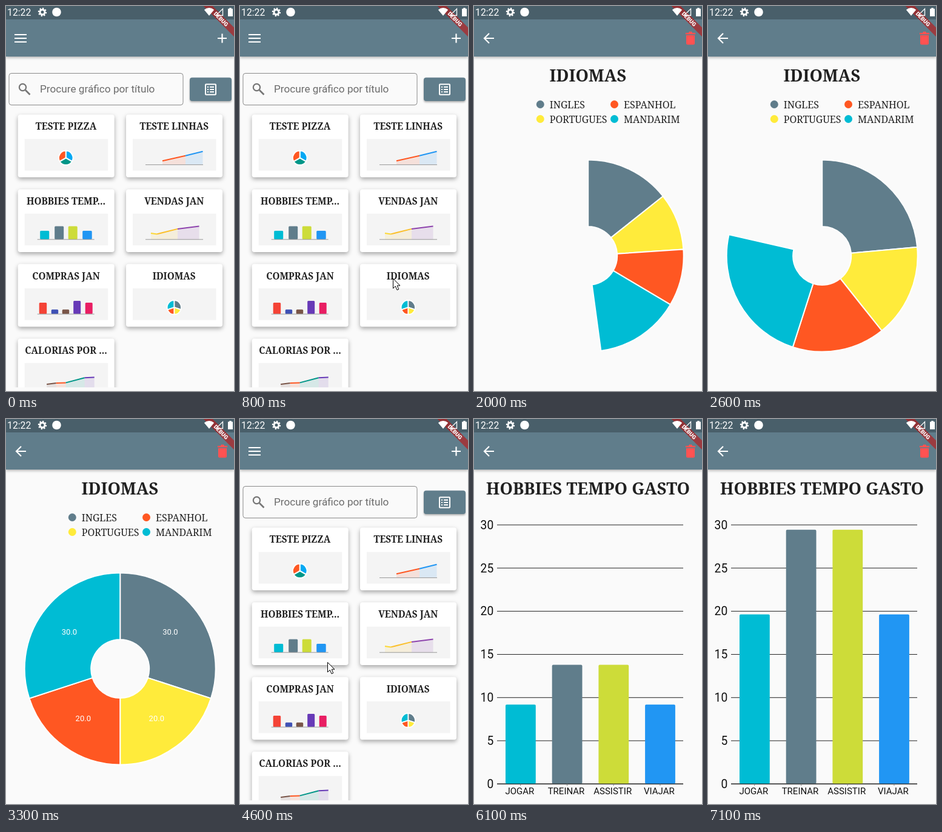
An HTML page for the animation above (7.2 s loop, 376 px wide and 632 px high).

```html
<!DOCTYPE html>
<html lang="pt">
<head>
<meta charset="utf-8">
<title>Gráficos</title>
<style>
  html, body { margin: 0; width: 100%; height: 100%; overflow: hidden; background: #fafafa; }
  svg { display: block; width: 376px; height: 632px; }
  text { font-family: Roboto, sans-serif; white-space: pre; }
  .serif { font-family: "Noto Serif", serif; }
  .title { font-weight: 700; fill: #212121; }
  .mid { text-anchor: middle; }
  .end { text-anchor: end; }
  .line { fill: none; stroke: #fff; stroke-width: 2.2; }
  .bar { filter: drop-shadow(0 2px 2px rgba(0,0,0,.28)); }
  .card { fill: #fff; filter: drop-shadow(0 3px 3.5px rgba(0,0,0,.34)); }
  .btn { filter: drop-shadow(0 2px 1.5px rgba(0,0,0,.3)); }
</style>
</head>
<body>
<svg viewBox="0 0 376 632">
  <defs><clipPath id="list"><rect y="84" width="376" height="542"/></clipPath></defs>
  <g id="home"></g>
  <g id="pie"></g>
  <g id="bars"></g>
  <g id="top"></g>
  <path id="cursor" d="M.5 .5V16.5L4.3 13 7 19.2 9.8 18 7.2 12H12Z" fill="#fff" stroke="#000"/>
</svg>
<script>
const $ = id => document.getElementById(id);
const LOOP = 7200, STEP = 100;
const C = {
  slate: '#607d8b', cyan: '#00bcd4', yellow: '#ffeb3b', orange: '#ff5722', lime: '#cddc39',
  blue: '#2196f3', sky: '#03a9f4', teal: '#009688', purple: '#673ab7', violet: '#8e44ad',
  red: '#f44336', indigo: '#3f51b5', brown: '#795548', pink: '#e91e63', gold: '#fbc02d'
};

const rect = (x, y, w, h, fill, extra = '') =>
  `<rect x="${x}" y="${y}" width="${w}" height="${h}" fill="${fill}" ${extra}/>`;
const text = (x, y, size, str, cls = '', fill = '#212121') =>
  `<text x="${x}" y="${y}" font-size="${size}" class="${cls}" fill="${fill}">${str}</text>`;
const hline = (x1, x2, y, color) => `<path d="M${x1} ${y}H${x2}" stroke="${color}"/>`;

const clamp = v => Math.min(1, Math.max(0, v));
const polar = (cx, cy, r, turn) => {
  const a = turn * 2 * Math.PI;
  return `${(cx + r * Math.sin(a)).toFixed(2)} ${(cy - r * Math.cos(a)).toFixed(2)}`;
};

// Slices run clockwise from the top; parts are [share, colour].
function slices(cx, cy, r, hole, parts, sweep, stroke) {
  let from = 0;
  return parts.map(([share, color]) => {
    const to = from + share * sweep, big = +(to - from > .5);
    const d = `M${polar(cx, cy, hole, from)}L${polar(cx, cy, r, from)}` +
      `A${r} ${r} 0 ${big} 1 ${polar(cx, cy, r, to)}L${polar(cx, cy, hole, to)}` +
      `A${hole} ${hole} 0 ${big} 0 ${polar(cx, cy, hole, from)}Z`;
    from = to;
    return `<path d="${d}" fill="${color}" stroke="#fff" stroke-width="${stroke}"/>`;
  }).join('');
}

const LANGS = [[.3, C.slate], [.2, C.yellow], [.2, C.orange], [.3, C.cyan]];

const appBar = icons =>
  rect(0, 0, 376, 632, '#fafafa') + rect(0, 0, 376, 83, C.slate, 'class="bar"') + icons;

// Previews use coordinates relative to their card.
const miniBars = bars => bars.map(([x, w, top, color]) =>
  rect(x, top, w, 82 - top, color, 'rx="1.5"')).join('') + hline(32, 126, 82.3, '#999');

function miniLine(base, parts) {
  return parts.map(([color, ...pts]) => {
    const d = 'M' + pts.map(p => p.join(' ')).join('L');
    const last = pts[pts.length - 1][0];
    return `<path d="${d}V${base}H${pts[0][0]}Z" fill="${color}" opacity=".12"/>` +
      `<path d="${d}" fill="none" stroke="${color}" stroke-width="2"/>`;
  }).join('') + hline(32, 127, base, '#999');
}

const CARDS = [
  ['TESTE PIZZA', slices(79, 71, 11.8, .5, [[1 / 3, C.sky], [1 / 3, C.teal], [1 / 3, C.orange]], 1, 2)],
  ['TESTE LINHAS', miniLine(82.3, [
    [C.orange, [60, 76], [98, 67.5]], [C.blue, [98, 67.5], [126.5, 60.5]]])],
  ['HOBBIES TEMP...', miniBars([
    [36.5, 15, 68, C.cyan], [60.5, 15, 60.5, C.slate], [83, 15, 60.5, C.lime], [106.5, 15.5, 68, C.blue]])],
  ['VENDAS JAN', miniLine(82.3, [
    ['#fdd835', [41, 72], [51, 73.5]], [C.gold, [51, 73.5], [85, 65]], [C.violet, [85, 65], [120.5, 60.5]]])],
  ['COMPRAS JAN', miniBars([
    [35, 12.5, 63.5, C.red], [55, 11.5, 74.7, C.indigo], [73, 11.5, 74.7, C.brown],
    [91.5, 12, 60.5, C.purple], [111, 12, 63.5, C.pink]])],
  ['IDIOMAS', slices(79.3, 71.3, 11.6, .5, LANGS, 1, 1.8)],
  ['CALORIAS POR ...', miniLine(82.3, [
    [C.brown, [47.5, 75], [63, 72.8]], [C.orange, [63, 72.8], [79, 72.3]],
    [C.teal, [79, 72.3], [110, 64.2]], [C.purple, [110, 64.2], [126, 63.5]]])]
];

const card = ([name, chart], i) =>
  `<g transform="translate(${i % 2 ? 198 : 19.7} ${178.3 + (i >> 1) * 122.6})">` +
  rect(0, 0, 159, 103, '#fff', 'rx="4" class="card"') +
  text(79.3, 25, 15.3, name, 'serif title mid') +
  rect(11, 40, 137.5, 52, '#f4f4f4') + chart + '</g>';

$('home').innerHTML = appBar(
    '<path class="line" d="M14 47H34M14 53H34M14 59H34M349 53H364M356.5 45.5V60.5"/>') +
  rect(5, 110.5, 287, 52, 'none', 'rx="4" stroke="#8a8a8a"') +
  '<path d="M32 138L39.5 145.5" stroke="#757575" stroke-width="2.6"/>' +
  '<circle cx="27.5" cy="133.5" r="5.6" fill="none" stroke="#757575" stroke-width="2.2"/>' +
  text(56, 142, 17.2, 'Procure gráfico por título', '', '#6c6c6c') +
  rect(303, 117.5, 69, 38.5, C.slate, 'rx="4" class="btn"') +
  rect(329, 128.5, 17, 17, 'none', 'rx="1" stroke="#fff" stroke-width="2"') +
  '<path d="M332 133H334M332 137H334M332 141H334M336 133H343M336 137H343M336 141H343" stroke="#fff" stroke-width="2"/>' +
  `<g clip-path="url(#list)">${CARDS.map(card).join('')}</g>`;

const detail = name => appBar(
    '<path class="line" d="M33 53H17M25 45L17 53L25 61"/>' +
    '<path d="M349 44H354L355 42H359L360 44H365V46.5H349ZM350 48H364V61Q364 63.5 361.5 63.5H352.5Q350 63.5 350 61Z" fill="#ff5252"/>') +
  text(188, 124.3, 27.3, name, 'serif title mid');

const legend = (x, y, color, name) =>
  `<circle cx="${x}" cy="${y}" r="6.5" fill="${color}"/>` + text(x + 15.5, y + 6, 16, name, 'serif');

const value = (x, y, str) => text(x, y, 13, str, 'mid', '#fff');

$('pie').innerHTML = detail('IDIOMAS') +
  legend(109.3, 161.5, C.slate, 'INGLES') + legend(231.5, 161.5, C.orange, 'ESPANHOL') +
  legend(109.3, 185.5, C.yellow, 'PORTUGUES') + legend(231.5, 185.5, C.cyan, 'MANDARIM') +
  '<g id="ring"></g><g id="values">' +
  value(271, 353.5, '30.0') + value(248.3, 496, '20.0') +
  value(127.3, 496, '20.0') + value(104.5, 353.5, '30.0') + '</g>';

const BASE = 599, UNIT = 14.17;
const HOBBIES = [['JOGAR', 20, C.cyan], ['TREINAR', 30, C.slate], ['ASSISTIR', 30, C.lime], ['VIAJAR', 20, C.blue]];
const barX = i => 52 + i * 76.7;

let grid = '';
for (let v = 0; v <= 30; v += 5) {
  const y = BASE - v * UNIT;
  grid += hline(38, 345, y, '#222') + text(32.3, y + 6.8, 19.3, v, 'end', '#111');
}
$('bars').innerHTML = detail('HOBBIES TEMPO GASTO') + grid + '<g id="columns"></g>' +
  hline(38, 345, BASE, '#222') +
  HOBBIES.map(([name], i) => {
    const x = barX(i) + 24.8;
    return `<path d="M${x} ${BASE}v3" stroke="#777"/>` + text(x - 1.5, 616, 15, name, 'mid', '#111');
  }).join('');

$('top').innerHTML = rect(0, 0, 376, 22, '#000', 'opacity=".24"') +
  '<g transform="translate(376 0) rotate(45) scale(.89)">' +
  rect(-42, 28, 84, 12, '#b71c1c', 'fill-opacity=".68"') +
  '<text y="37.7" font-size="10.3" font-weight="900" class="mid" fill="#fff">DEBUG</text></g>' +
  text(2, 15.5, 15.8, '12:22', '', '#fff') +
  '<g fill="none" stroke="#fff"><circle cx="60" cy="10" r="4" stroke-width="3"/>' +
  '<circle cx="60" cy="10" r="6" stroke-width="2.4" pathLength="16" stroke-dasharray="1"/></g>' +
  '<circle cx="83.5" cy="10" r="7.3" fill="#fff"/>' +
  '<path d="M335 16L326.8 6.2Q335 0 343.2 6.2ZM366 4.5H368.3V3H371.7V4.5H374V17H366Z" fill="#fff"/>' +
  '<path d="M346.5 15.5L357.5 4.5V15.5Z" fill="none" stroke="#fff" stroke-width="1.3"/>';

// Cubic Bézier easing, solved by bisection.
function bezier(x1, y1, x2, y2) {
  const at = (a, b, u) => 3 * a * u * (1 - u) ** 2 + 3 * b * u * u * (1 - u) + u ** 3;
  return x => {
    let lo = 0, hi = 1;
    for (let i = 0; i < 24; i++) {
      const m = (lo + hi) / 2;
      if (at(x1, x2, m) < x) lo = m; else hi = m;
    }
    return at(y1, y2, (lo + hi) / 2);
  };
}
const slide = bezier(.4, 0, .2, 1), fade = bezier(.42, 0, 1, 1);

function showPage(id, p) {
  const page = $(id);
  page.style.display = p > 0 ? '' : 'none';
  page.setAttribute('opacity', p < 1 ? fade(p) : 1);
  page.setAttribute('transform', `translate(0 ${p < 1 ? 158 * (1 - slide(p)) : 0})`);
}

// Each visit of the pointer: [time, x, y].
const VISITS = [
  [[300, 366, 590], [800, 252, 447], [1400, 252, 447], [1800, 330, 632]],
  [[4200, 362, 598], [4600, 144, 399], [4900, 145, 323], [5000, 129, 313], [5400, 129, 313], [5900, 210, 632]]
];

function movePointer(t) {
  const path = VISITS.find(v => t >= v[0][0] && t < v[v.length - 1][0]);
  $('cursor').style.display = path ? '' : 'none';
  if (!path) return;
  const i = path.findIndex(k => k[0] > t), [t0, x0, y0] = path[i - 1], [t1, x1, y1] = path[i];
  const k = (t - t0) / (t1 - t0);
  $('cursor').setAttribute('transform', `translate(${x0 + (x1 - x0) * k} ${y0 + (y1 - y0) * k})`);
}

function draw(t) {
  showPage('pie', Math.min(clamp((t - 1000) / 300), clamp((4000 - t) / 300)));
  showPage('bars', clamp((t - 5100) / 300));

  const sweep = clamp((t - 1064) / 1956);
  $('ring').innerHTML = sweep ? slices(188.2, 410, 157.5, 48, LANGS, sweep, 2) : '';
  $('values').style.display = sweep < 1 ? 'none' : '';

  const grow = clamp((t - 5219) / 1916);
  $('columns').innerHTML = HOBBIES.map(([, v, color], i) => {
    const h = v * UNIT * grow;
    return rect(barX(i), BASE - h, 49.8, h, color, 'rx="2"');
  }).join('');

  movePointer(t);
}

const start = performance.now();
function tick(now) {
  const t = Math.max(0, now - start) % LOOP;
  draw(Math.floor(t / STEP) * STEP);
  requestAnimationFrame(tick);
}
draw(0);
requestAnimationFrame(tick);
</script>
</body>
</html>
```
